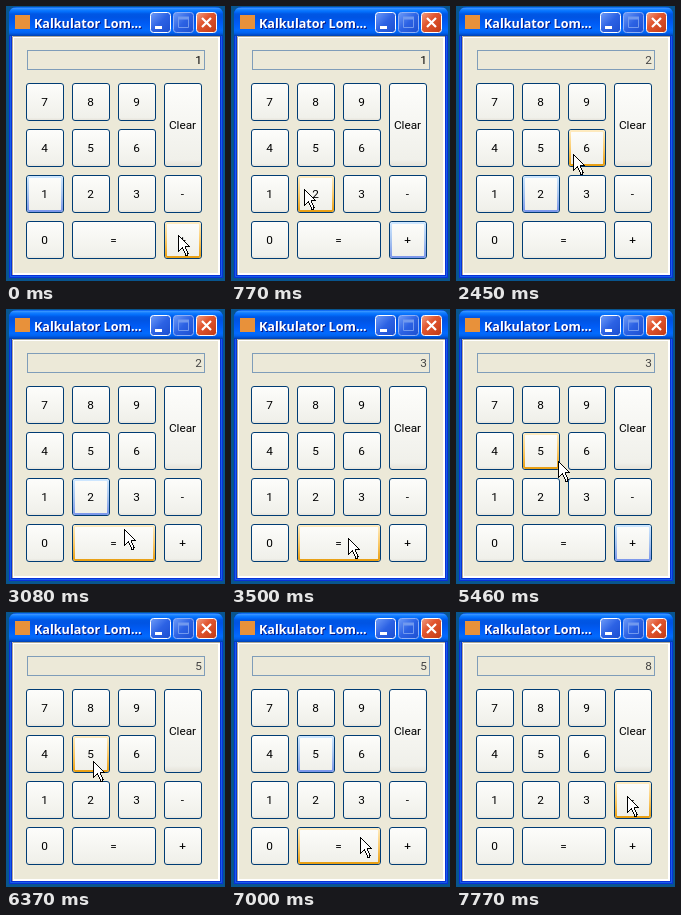
Recreate the animation shown at these times as an HTML page. Size 219 by 275 pixels, loop 8000 ms.

```html
<!DOCTYPE html>
<html lang="en">
<head>
<meta charset="utf-8">
<title>Calculator</title>
<style>
  html, body { margin: 0; width: 100%; height: 100%; overflow: hidden; background: #08558f; }
  svg { display: block; }
  text { font: 11.8px Roboto, "Liberation Sans", sans-serif; }
  .title { font: bold 12.6px "Open Sans", "Noto Sans", sans-serif; }
  .key text { text-anchor: middle; }
  .face { fill: url(#face); stroke: #003c74; }
  .ring { fill: none; stroke: none; stroke-width: 2; }
  .focus .ring { stroke: url(#focus); }
  .hot .ring { stroke: url(#hot); }
  .down .face { fill: url(#down); }
  .down .ring { stroke: none; }
</style>
</head>
<body>
<svg id="stage" width="219" height="275" viewBox="0 0 219 275">
  <defs>
    <linearGradient id="bar" x2="0" y2="1">
      <stop stop-color="#0058ee"/><stop offset=".05" stop-color="#3593ff"/>
      <stop offset=".1" stop-color="#127dff"/><stop offset=".16" stop-color="#036ffc"/>
      <stop offset=".24" stop-color="#0057e5"/><stop offset=".35" stop-color="#0054e3"/>
      <stop offset=".56" stop-color="#005bf5"/><stop offset=".8" stop-color="#026afe"/>
      <stop offset=".89" stop-color="#0062ef"/><stop offset=".94" stop-color="#0052d6"/>
      <stop offset="1" stop-color="#0040ab"/>
    </linearGradient>
    <linearGradient id="face" x2="0" y2="1">
      <stop stop-color="#fdfdfb"/><stop offset=".92" stop-color="#f0f0ea"/><stop offset="1" stop-color="#e4e1d8"/>
    </linearGradient>
    <linearGradient id="down" x2="0" y2="1">
      <stop stop-color="#d6d2c8"/><stop offset=".15" stop-color="#e3e2da"/><stop offset="1" stop-color="#f2f1ee"/>
    </linearGradient>
    <linearGradient id="focus" x2="0" y2="1">
      <stop stop-color="#cee7ff"/><stop offset=".5" stop-color="#a9c6f0"/><stop offset="1" stop-color="#7c97ea"/>
    </linearGradient>
    <linearGradient id="hot" x2="0" y2="1">
      <stop stop-color="#feebc0"/><stop offset=".5" stop-color="#fbcb6c"/><stop offset="1" stop-color="#e89f14"/>
    </linearGradient>
    <linearGradient id="blue" x2="1" y2="1">
      <stop stop-color="#6f9cf8"/><stop offset=".5" stop-color="#2c62e4"/><stop offset="1" stop-color="#1c4fd0"/>
    </linearGradient>
    <linearGradient id="red" x2="1" y2="1">
      <stop stop-color="#f0a088"/><stop offset=".4" stop-color="#e2562f"/><stop offset="1" stop-color="#c23a14"/>
    </linearGradient>
  </defs>

  <!-- window frame with a sunken client edge -->
  <path d="M3 272V9Q3 1 11 1H209Q217 1 217 9V272Z" fill="#0831d9"/>
  <path d="M4.5 30V270.5H215.5V30" fill="none" stroke="#1660e8"/>
  <path d="M3 30V9Q3 1 11 1H209Q217 1 217 9V30Z" fill="url(#bar)"/>
  <rect x="6" y="30" width="208" height="239" fill="#fff"/>
  <path d="M6.5 269V30.5H214" fill="none" stroke="#aca899"/>
  <rect x="8" y="32" width="204" height="235" fill="#ece9d8"/>

  <!-- title bar -->
  <rect x="9" y="9" width="15" height="14" fill="#e8913a"/>
  <text class="title" x="29" y="23" fill="#0a1883">Kalkulator Lom...</text>
  <text class="title" x="28" y="22" fill="#fff">Kalkulator Lom...</text>
  <g stroke="#fff">
    <rect x="144.5" y="6.5" width="20" height="20" rx="3" fill="url(#blue)"/>
    <rect x="167.5" y="6.5" width="20" height="20" rx="3" fill="url(#blue)" stroke="#8fb0f5"/>
    <rect x="190.5" y="6.5" width="20" height="20" rx="3" fill="url(#red)"/>
  </g>
  <path d="M149 21.5h7" stroke="#fff" stroke-width="3"/>
  <path d="M172.5 11v10.5h10V11" fill="none" stroke="#7199ee"/>
  <path d="M172 12h11" stroke="#7199ee" stroke-width="3"/>
  <path d="M196 12l9 9m0-9l-9 9" stroke="#fff" stroke-width="2.2"/>

  <!-- display -->
  <rect x="21.5" y="44.5" width="177" height="19" fill="#ece9d8" stroke="#7f9db9"/>
  <text id="display" x="196" y="58" text-anchor="end"></text>

  <g id="keys"></g>
  <path id="cursor" d="M.5 .5V16.5L4.5 12.5L8 20.5H9.5L10 18.5L7.5 12.5V11.5H11.5Z"
        fill="#fff" stroke="#000" shape-rendering="crispEdges"/>
</svg>
<script>
const LOOP = 8000, TICK = 70, PITCH = 46;
const $ = id => document.getElementById(id);

// label, column, row, columns spanned, rows spanned
const keys = [
  ['7', 0, 0], ['8', 1, 0], ['9', 2, 0], ['Clear', 3, 0, 1, 2],
  ['4', 0, 1], ['5', 1, 1], ['6', 2, 1],
  ['1', 0, 2], ['2', 1, 2], ['3', 2, 2], ['-', 3, 2],
  ['0', 0, 3], ['=', 1, 3, 2], ['+', 3, 3]
].map(([label, col, row, cols = 1, rows = 1]) => {
  const x = 20 + col * PITCH, y = 77 + row * PITCH;
  const w = cols * PITCH - 8, h = rows * PITCH - 8;
  const el = document.createElementNS('http://www.w3.org/2000/svg', 'g');
  el.innerHTML =
    `<rect class="face" x="${x + .5}" y="${y + .5}" width="${w - 1}" height="${h - 1}" rx="2.5"/>
     <rect class="ring" x="${x + 2}" y="${y + 2}" width="${w - 4}" height="${h - 4}" rx="1.5"/>
     <text x="${x + w / 2 - .5}" y="${y + h / 2 + 4}">${label}</text>`;
  $('keys').append(el);
  return { label, x, y, w, h, el };
});

// time, pointer x, pointer y
const path = [
  [140, 172, 229], [280, 158, 224], [630, 84, 188], [770, 73, 183],
  [1890, 73, 183], [2170, 111, 149], [2380, 111, 149], [2450, 117, 148],
  [2520, 117, 148], [2660, 118, 156], [3010, 118, 215], [3220, 117, 229],
  [3920, 117, 229], [4340, 160, 205], [4760, 172, 228],
  [5180, 172, 228], [5460, 102, 152], [5740, 84, 144],
  [6300, 84, 144], [6440, 89, 153], [6860, 124, 218], [7000, 129, 225],
  [7140, 165, 210], [7420, 171, 184]
];
// time pressed, time released, key
const presses = [
  [-140, 0, '1'], [70, 210, '+'], [1470, 1610, '2'], [3360, 3500, '='],
  [4970, 5110, '+'], [5880, 6090, '5'], [7630, 7770, '-']
];
// time, number shown, ink
const values = [
  [0, '1', '#000'], [1610, '2', '#444'], [3500, '3', '#444'],
  [6090, '5', '#444'], [7770, '8', '#444']
];

const latest = (list, t) => list.filter(e => e[0] <= t).pop();

function pointer(t) {
  const b = path.find(p => p[0] > t), a = latest(path, t);
  if (!a || !b) return (a || b).slice(1);
  const k = (t - a[0]) / (b[0] - a[0]);
  return [1, 2].map(i => Math.round(a[i] + (b[i] - a[i]) * k));
}

function draw(now) {
  const t = Math.floor(now % LOOP / TICK) * TICK;
  const [px, py] = pointer(t), [, up, active] = latest(presses, t);
  for (const { label, x, y, w, h, el } of keys) {
    const over = px >= x && px < x + w && py >= y && py < y + h;
    const focus = label === active;
    el.setAttribute('class', 'key' + (focus ? ' focus' : '') +
      (over ? ' hot' : '') + (focus && t < up ? ' down' : ''));
  }
  const [, value, ink] = latest(values, t);
  $('display').textContent = value;
  $('display').setAttribute('fill', ink);
  $('cursor').setAttribute('transform', `translate(${px} ${py})`);
}

const start = performance.now();
function frame() {
  draw(performance.now() - start);
  requestAnimationFrame(frame);
}
frame();
</script>
</body>
</html>
```
